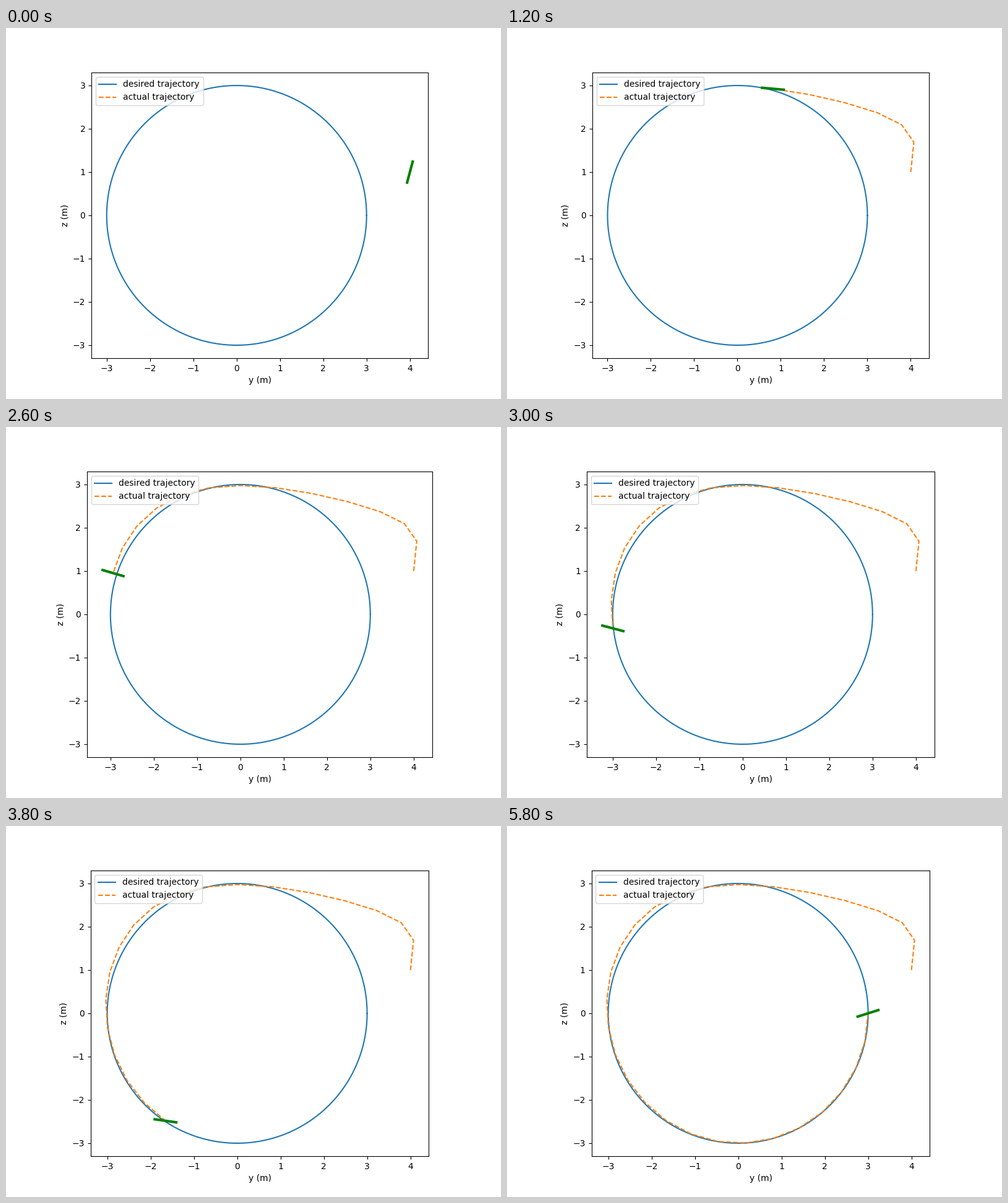
Animation of 800 by 600 pixels, one loop 6000 ms. Source, as a matplotlib script:

```python
import numpy as np
import matplotlib.pyplot as plt
from matplotlib.animation import FuncAnimation

FRAMES = 30
STEP = 0.2
RADIUS = 3.0
ARM = 0.25
GRAVITY = 9.81
OMEGA = 2 * np.pi / ((FRAMES - 1) * STEP)


def circle(angle):
    return RADIUS * np.cos(angle), RADIUS * np.sin(angle)


def error_y(t):
    swing = 2.92 * np.exp(-1.21 * t) * np.sin(1.757 * (1.31 - t))
    return swing - 1.1735 * np.exp(-1.78 * t ** 1.45)


def error_z(t):
    return np.exp(-2.1 * t) * (np.cos(2 * t) + 1.72 * np.sin(2 * t))


def roll_angle(t):
    """Tilt that holds the turn plus a damped swing from the start."""
    ref_y, ref_z = circle(OMEGA * t)
    turn = np.arctan2(OMEGA ** 2 * ref_y, GRAVITY - OMEGA ** 2 * ref_z)
    return 0.88 * turn + 1.007 * np.exp(-1.14 * t) * np.cos(2.15 * t)


time = np.arange(FRAMES) * STEP
ref_y, ref_z = circle(OMEGA * time)
path_y = ref_y + error_y(time)
path_z = ref_z + error_z(time)
roll = roll_angle(time)

fig, ax = plt.subplots(figsize=(8, 6), dpi=100)
ax.set_aspect("equal", adjustable="box")
ax.plot(*circle(np.linspace(0, 2 * np.pi, 201)), label="desired trajectory")
trail, = ax.plot([], [], "--", label="actual trajectory")
body, = ax.plot([], [], color="green", lw=3)
ax.set_xlabel("y (m)")
ax.set_ylabel("z (m)")
ax.legend(loc="upper left")


def update(i):
    trail.set_data(path_y[:i + 1], path_z[:i + 1])
    dy, dz = ARM * np.cos(roll[i]), ARM * np.sin(roll[i])
    body.set_data([path_y[i] - dy, path_y[i] + dy],
                  [path_z[i] - dz, path_z[i] + dz])
    ax.relim()
    ax.autoscale_view()
    return trail, body


anim = FuncAnimation(fig, update, frames=FRAMES, interval=200, repeat=True,
                     repeat_delay=0, blit=False)
plt.show()
```
